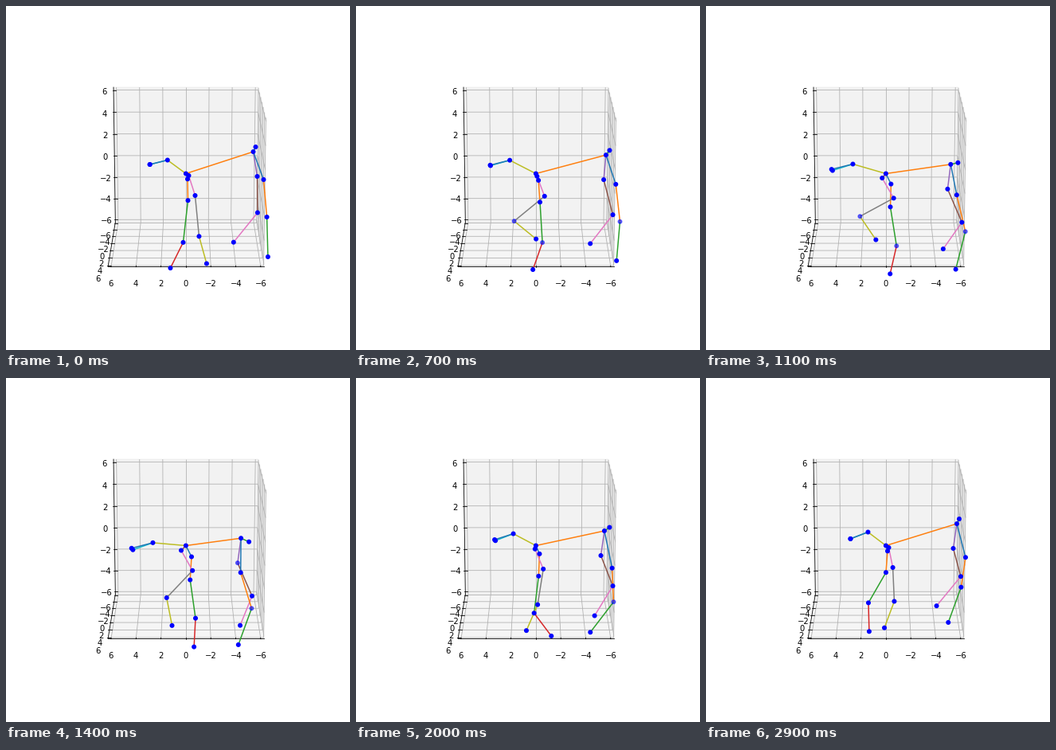
Write a matplotlib script that moves like this. It is 432x432 px and loops after 3 s.

```python
import numpy as np
import matplotlib.pyplot as plt
from matplotlib.animation import FuncAnimation
from matplotlib.collections import LineCollection

SIZE, FRAMES, STEP = 432, 30, 100
E = 6.25           # half-width of the box in data units
LABEL = E + 0.835  # where the tick labels sit
TICKS = range(-6, 7, 2)
ELEV = np.radians(15)

fig = plt.figure(figsize=(6, 6), dpi=72)
ax = fig.add_axes([0, 0, 1, 1])
ax.set_xlim(0, SIZE)
ax.set_ylim(SIZE, 0)
ax.set_axis_off()


def project(x, y, z):
    """Perspective view from +y, slightly above; returns stage pixels."""
    x, y, z = x / 12, y / 12, z / 12
    depth = 10 - y * np.cos(ELEV) - z * np.sin(ELEV)
    up = z * np.cos(ELEV) - y * np.sin(ELEV)
    return 225.925 - 1809.7 * x / depth, 210.51 - 1763 * up / depth


def path(*points):
    return [project(*p) for p in points]


# --- box: panes, grid, axes, ticks ---
panes = [
    (0.95, [(-E, -E, -E), (-E, E, -E), (-E, E, E), (-E, -E, E)]),
    (0.90, [(-E, -E, -E), (E, -E, -E), (E, -E, E), (-E, -E, E)]),
    (0.925, [(-E, -E, -E), (E, -E, -E), (E, E, -E), (-E, E, -E)]),
]
for shade, corners in panes:
    tint = (shade, shade, shade, 0.5)
    ax.add_patch(plt.Polygon(path(*corners), closed=False, lw=1, zorder=0,
                             fc=tint, ec=tint))

grid = []
for v in TICKS:
    grid += [path((v, E, -E), (v, -E, -E), (v, -E, E)),
             path((E, v, -E), (-E, v, -E), (-E, v, E)),
             path((E, -E, v), (-E, -E, v), (-E, E, v))]
ax.add_collection(LineCollection(grid, colors="#b0b0b0", linewidths=0.8,
                                 zorder=0.5), autolim=False)


def stroke(*points):
    xs, ys = zip(*path(*points))
    ax.plot(xs, ys, color="k", lw=0.8, zorder=1)


def tick_label(value, *point):
    x, y = project(*point)
    ax.text(x, y, str(value).replace("-", "\u2212"), fontsize=10,
            family="DejaVu Sans", ha="center", va="top", zorder=1)


stroke((-E, E, -E), (E, E, -E))
stroke((E, -E, -E), (E, E, -E))
stroke((E, -E, -E), (E, -E, E))
outer, inner = E + 0.1, E - 0.2
for v in TICKS:
    stroke((v, outer, -E), (v, inner, -E))
    stroke((outer, v, -E), (inner, v, -E))
    stroke((outer, -E, v), (inner, -E, v))
    tick_label(v, v, LABEL, -LABEL)
    tick_label(v, LABEL, v, -LABEL)
    tick_label(v, LABEL, -LABEL, v)

# --- walking skeleton ---
# Swing of the lower leg bones: degrees from straight down at the key times.
KEY_TIMES = np.array([0, 4, 9, 14, 20, 24, 29])
swing = {
    "a3": [-6.5, -3.5, 7.5, 8, -7, -25.5, -30],
    "a4": [-26.5, -21.5, -17, -3, 37, 41, 1.5],
    "b3": [5.5, -19, -65, -43.5, -9, 3.5, 2.5],
    "b4": [15.5, 46.5, 46, 11, -23.5, -21.5, -20.5],
    "c2": [0.5, 4, 21, 23.5, 21.5, 16.5, 15],
    "c3": [-39, -29.5, -42, -22, -31.5, -31.5, -39.5],
    "d2": [5, 3, 9.5, 17, 2.5, 6, -8.5],
    "d3": [1.5, 2, -10.5, -20, -37.5, -31, -20],
}


def angle(joint, frame):
    """Cubic Hermite curve through the key angles, in radians."""
    keys = np.array(swing[joint], float)
    slope = np.gradient(keys, KEY_TIMES)
    i = np.searchsorted(KEY_TIMES[1:-1], frame, side="right")
    span = KEY_TIMES[i + 1] - KEY_TIMES[i]
    u = (frame - KEY_TIMES[i]) / span
    rise = u * u * (3 - 2 * u)
    bend = span * u * (1 - u) * ((1 - u) * slope[i] - u * slope[i + 1])
    return np.radians(keys[i] + rise * (keys[i + 1] - keys[i]) + bend)


def bump(frame, centre, width, power=2):
    return np.exp(-abs((frame - centre) / width) ** power)


def pose(f):
    dip = bump(f, 14.3, 6.4, 3)      # body sinks
    lurch = bump(f, 14.8, 3.75)      # short sideways jerk
    reach = bump(f, 12.5, 6.8)       # head stretches forward
    settle = 1 - np.exp(-f / 4)
    fold = 1 - 0.11 * np.tanh((f - 20) / 3)
    at = {}

    def put(joint, x, y, base=None):
        at[joint] = np.array([x, y]) + (at[base] if base else 0)

    def hang(joint, base, length):
        turn = angle(joint, f)
        put(joint, length * np.sin(turn), length * np.cos(turn), base)

    put("neck", 225.9, 210.5)
    put("head", 203.5 - 20 * reach, 193.5 + 14 * lurch)
    put("nose", -22 - 5 * reach, 5.5 + 0.1 * f, "head")
    jaw = bump(f, 15, 7)
    put("jaw", 1.7 * jaw, 2 * jaw, "nose")
    put("hip", 310.5 + 4.5 * settle - 20.7 * lurch, 183 + 18.2 * dip)
    put("tail", 3 + 7 * dip, -6 + 11 * lurch, "hip")

    put("a1", 228 + 5 * dip, 217.3 + 7.2 * dip)
    put("a2", 228.5 + 3 * np.sin(np.pi * f / 22), 244.2 + 9.3 * dip)
    hang("a3", "a2", 53 - 0.31 * f)
    hang("a4", "a3", 36)

    put("b1", 229.5 - 9.5 * dip, 213 + 3.5 * dip)
    put("b2", 237.5 - 0.1 * f - 2 * lurch, 238 + 3.8 * dip)
    hang("b3", "b2", 51.5 - 0.31 * f)
    hang("b4", "b3", 35.5)

    put("c1", 5 - 9.5 * settle, 31, "hip")
    hang("c2", "c1", 41 * fold)
    hang("c3", "c2", 47.8 - 8 * dip)

    put("d1", 13 - 0.07 * f - 13 * lurch,
        35 + 0.25 * f + 10 * bump(f, 17.5, 4), "hip")
    hang("d2", "d1", 42.5 * fold)
    hang("d3", "d2", 50 - 0.1 * f)
    return at


# chains of joints with the colours of their bones in the default cycle
chains = [
    ("neck a1 a2 a3 a4", (0, 1, 2, 3)),
    ("neck b1 b2 b3 b4", (5, 6, 7, 8)),
    ("neck head jaw", (8, 9)),
    ("head nose", (0,)),
    ("neck hip tail", (1, 2)),
    ("hip c1 c2 c3", (4, 5, 6)),
    ("hip d1 d2 d3", (0, 1, 2)),
]
bones, colors = [], []
for chain, cycle in chains:
    joints = chain.split()
    bones += zip(joints, joints[1:])
    colors += [f"C{c}" for c in cycle]

# joints that recede and fade, with the span of frames
faded = {"a3": (7, 11), "b3": (7, 11), "c1": (12, 16), "d2": (7, 21)}

limbs = LineCollection([], colors=colors, linewidths=1.5, zorder=2)
ax.add_collection(limbs, autolim=False)
names = list(pose(0))
dots = ax.scatter(np.zeros(len(names)), np.zeros(len(names)), s=20,
                  linewidths=1.5, color="b", zorder=3)


def draw(frame):
    at = pose(frame)
    limbs.set_segments([[at[p], at[q]] for p, q in bones])
    dots.set_offsets([at[n] for n in names])
    blues = []
    for n in names:
        first, last = faded.get(n, (FRAMES, FRAMES))
        blues.append((0, 0, 1, 0.55 if first <= frame <= last else 1))
    dots.set_facecolor(blues)
    dots.set_edgecolor(blues)
    return limbs, dots


anim = FuncAnimation(fig, draw, frames=FRAMES, interval=STEP, repeat=True,
                     repeat_delay=0, blit=False)
plt.show()
```
